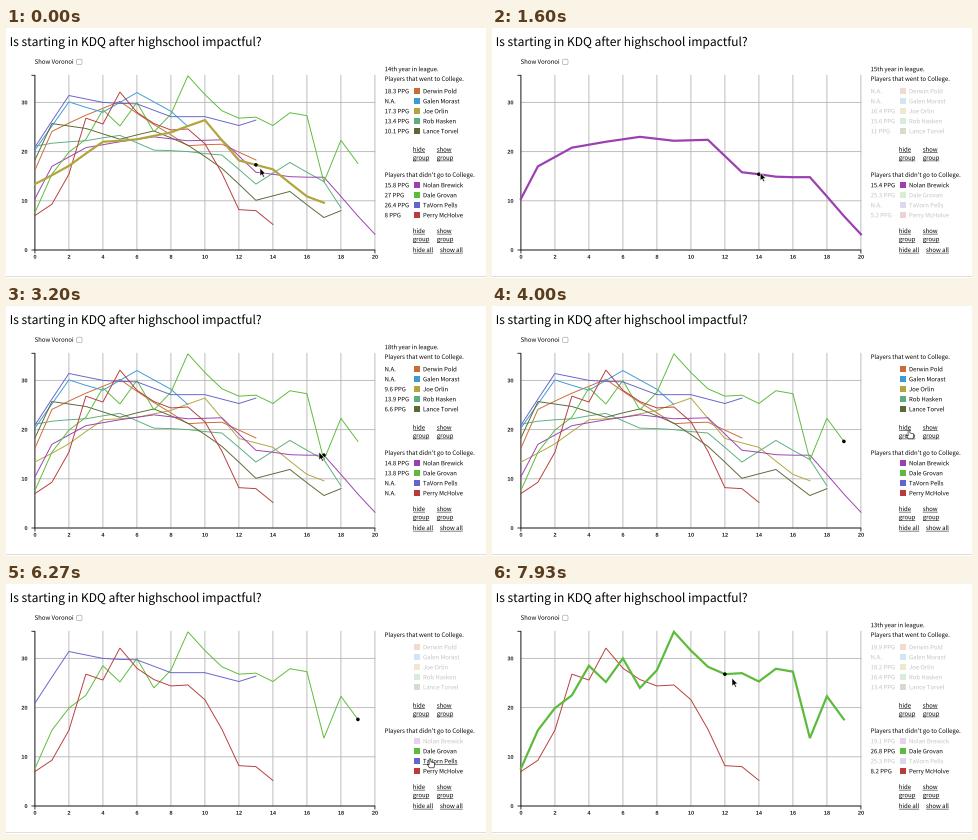
Animation of 480 by 250 pixels, one loop 8000 ms. Source, as a matplotlib script:

```python
import numpy as np
import matplotlib.pyplot as plt
from matplotlib.animation import FuncAnimation
from matplotlib.patches import (Circle, FancyBboxPatch, PathPatch, Polygon,
                                Rectangle)
from matplotlib.textpath import TextPath
from matplotlib.transforms import Affine2D

W, H, DPI = 480, 250, 80
STEP, FRAMES = 50, 160
PT = 72 / DPI  # points per pixel
X0, Y0, DX, DY = 28.9, 222, 17, 4.92
X1, TOP = X0 + 20 * DX, 47.3
FADE = 0.24
SANS = "Noto Sans CJK JP"

fig = plt.figure(figsize=(W / DPI, H / DPI), dpi=DPI, facecolor="white")
ax = fig.add_axes([0, 0, 1, 1])
ax.set_xlim(0, W)
ax.set_ylim(H, 0)
ax.axis("off")


def line(xs, ys, color, width, **kw):
    return ax.plot(xs, ys, color=color, lw=width * PT, snap=False, **kw)[0]


class Label:
    """Text drawn as outlines, so that it keeps its exact position."""

    def __init__(self, x, y, s, size=5.95, align=0, color="black",
                 family=SANS, weight="normal"):
        self.place = x, y, align
        self.size = size
        self.prop = {"family": family, "weight": weight}
        self.string = None
        self.patch = ax.add_patch(PathPatch(
            TextPath((0, 0), "x", size=size, prop=self.prop),
            fc=color, lw=0, snap=False, zorder=5))
        self.write(s)

    def write(self, s):
        if s == self.string:
            return
        self.string = s
        self.patch.set_visible(bool(s))
        if s:
            x, y, align = self.place
            path = TextPath((0, 0), s, size=self.size, prop=self.prop)
            x -= align * path.get_extents().x1
            self.patch.set_path(
                Affine2D().scale(1, -1).translate(x, y).transform_path(path))

    def underline(self):
        box = self.patch.get_path().get_extents()
        y = self.place[1] + 1.1
        return line([box.x0, box.x1], [y, y], "black", 0.5)


def career(seasons, values, first, step):
    years = sorted({0, seasons - 1, *range(first, seasons, step)})
    return np.interp(range(seasons), years, values).round(1)


class Player:
    def __init__(self, name, color, seasons, values, first=0, step=2):
        k = len(players)
        self.row = 65.3 + 10 * k + (44 if k > 4 else 0)
        self.points = career(seasons, values, first, step)
        self.xs = X0 + DX * np.arange(seasons)
        self.ys = Y0 - DY * self.points
        self.curve = line(self.xs, self.ys, color, 1, solid_joinstyle="miter")
        self.swatch = ax.add_patch(
            Rectangle((407.5, self.row - 5.3), 6, 6, fc=color, ec="none"))
        self.label = Label(417, self.row, name)
        self.under = self.label.underline()
        self.stat = Label(378.6, self.row, "")
        players.append(self)

    def value(self, year):
        if year < len(self.points):
            return f"{self.points[year]:g} PPG"
        return "N.A."

    def update(self, shown, bold, year, hovered):
        self.curve.set_visible(shown)
        self.curve.set_linewidth((2.2 if bold else 0.95) * PT)
        self.curve.set_zorder(4 if bold else 3)
        for part in (self.swatch, self.label.patch, self.stat.patch):
            part.set_alpha(1 if shown else FADE)
        self.under.set_visible(hovered)
        self.stat.write("" if year is None else self.value(year))


# Grid and axes
GRID, INK = "#b8b8b8", "#222222"
TICK = dict(size=5.5, family="Liberation Sans", color=INK)
for k in range(0, 21, 2):
    x = X0 + DX * k
    line([x, x], [TOP, Y0], GRID, 0.9, zorder=1)
    Label(x, 230.7, str(k), align=0.5, weight="bold", **TICK)
for v in range(0, 31, 10):
    y = Y0 - DY * v
    line([X0, X1], [y, y], GRID, 0.9, zorder=1)
    Label(21.3, y + 2, str(v), align=1, weight="bold", **TICK)
line([X0 - 3, X0, X0, X0 - 3], [TOP, TOP, Y0, Y0], INK, 0.9, zorder=2)
line([X0, X0, X1, X1], [Y0 + 3, Y0, Y0, Y0 + 3], INK, 0.9, zorder=2)
line([0, W], [248.5, 248.5], "#dddddd", 1)

# Headings and controls
Label(3.7, 18, "Is starting in KDQ after highschool impactful?", 12)
Label(28.6, 35.8, "Show Voronoi", 6)
ax.add_patch(FancyBboxPatch((70.6, 31.2), 5.4, 5.4, fc="white", ec="#aaaaaa",
                            boxstyle="round,pad=0,rounding_size=1.4",
                            lw=0.7 * PT))
year_text = Label(378.6, 43.2, "")
Label(378.6, 52.9, "Players that went to College.")
Label(378.6, 148.9, "Players that didn't go to College.")
for y in (123.6, 205):
    for x, word in ((406.8, "hide"), (430.8, "show")):
        Label(x, y, word).underline()
        Label(x, y + 8.2, "group").underline()
Label(406.8, 224, "hide all").underline()
Label(434, 224, "show all").underline()

# Steady careers need only every other season
players = []
Player("Derwin Pold", "#cc6b35", 14,
       [16.2, 24.1, 27.4, 30.2, 25.5, 21.2, 21.5, 18.3], first=1)
Player("Galen Morast", "#3c9ad6", 10, [20.3, 30.1, 28, 32, 28.2, 25.1])
Player("Joe Orlin", "#b2a53c", 18,
       [13.4, 17.1, 22, 22.5, 23.9, 26.4, 18.2, 16.4, 10.9, 9.6])
Player("Rob Hasken", "#5bae7d", 19,
       [21.1, 21.7, 22.2, 23.3, 20.3, 20, 19.3, 13.4, 17.8, 13.9, 8.6],
       first=1)
Player("Lance Torvel", "#5a6a34", 19,
       [18.3, 25.7, 24.7, 22.5, 24.2, 21.3, 16.6, 10.1, 11.9, 6.6, 8],
       first=1)
Player("Nolan Brewick", "#9c3fb0", 21,
       [10.4, 17, 20.8, 22, 23, 22.2, 22.4, 15.8, 14.9, 14.8, 6.9, 3.2],
       first=1)
Player("Dale Grovan", "#5cbb3a", 20,
       [7.6, 15.4, 19.9, 22.5, 28.5, 25.2, 30, 24, 27.6, 35.4, 31.6, 28.3,
        26.8, 27, 25.3, 27.9, 27.3, 13.8, 22.3, 17.6], step=1)
Player("TaVorn Pells", "#6464cc", 14,
       [20.9, 31.4, 30, 29.7, 27.1, 27.1, 25.3, 26.4])
Player("Perry McHolve", "#b83c3c", 15,
       [7, 9.3, 15.4, 26.8, 25.6, 32.1, 28, 25.7, 24.4, 24.6, 21.6, 15.6,
        8.2, 8, 5.2], step=1)

dot = ax.add_patch(Circle((0, 0), 1.8, fc="black", ec="none", zorder=6))
ARROW = np.array([(0, 0), (0, 8.2), (1.9, 6.5), (3.2, 9.2), (4.5, 8.7),
                  (3.3, 6), (5.6, 5.8)])
HAND = np.array([(-.9, 0), (.8, 0), (.9, 2.9), (4.8, 4), (4, 8.8),
                 (-.6, 8.8), (-2.8, 5.2), (-.9, 5.8)])
arrow = ax.add_patch(Polygon(ARROW, fc="black", ec="white", lw=0.5, zorder=9))
hand = ax.add_patch(Polygon(HAND, fc="white", ec="#222222", lw=0.6, zorder=9,
                            joinstyle="round"))

# Pointer moves: start, end, where to
REST = np.array([254, 140])
MOVES = [(70, 130, 254, 144), (1330, 2270, 313, 146), (3530, 4000, 417, 124),
         (4930, 5400, 424, 157), (6070, 6270, 424, 175),
         (6670, 7270, 258, 180), (7530, 7930, 240, 94)]
# Visible players after each click
ALL = range(9)
CLICKS = [(0, ALL), (800, [5]), (3000, ALL), (4930, ALL[5:]),
          (5730, ALL[6:]), (6470, ALL[6::2])]
# After a redraw the curve stays thin until the pointer moves again
THIN = [(800, 1400), (3000, 3600)]


def clock(i):
    return i * STEP + 30


def pointer(t):
    at = REST
    for start, end, *goal in MOVES:
        u = np.clip((t - start) / (end - start), 0, 1)
        at = at + (np.array(goal) - at) * u * u * (3 - 2 * u)
    return at


def visible(t):
    return [who for start, who in CLICKS if start <= t][-1]


def in_chart(x, y):
    return X0 <= x <= X1 and TOP <= y <= Y0


def nearest(x, y, shown):
    cells = [(np.hypot(px - x, py - y), k, n) for k in shown
             for n, (px, py) in enumerate(zip(players[k].xs, players[k].ys))]
    return min(cells)[1:]


def hover_states():
    states, last = [], None
    for i in range(FRAMES):
        x, y = pointer(clock(i))
        if in_chart(x, y):
            last = nearest(x, y, visible(clock(i)))
        states.append(last)
    return states


HOVER = hover_states()


def ordinal(n):
    if 10 < n % 100 < 14:
        return f"{n}th"
    return f"{n}" + {1: "st", 2: "nd", 3: "rd"}.get(n % 10, "th")


def update(i):
    t = clock(i)
    x, y = pointer(t)
    shown = visible(t)
    who, year = HOVER[i]
    inside = in_chart(x, y)
    thin = any(a <= t < b for a, b in THIN)
    in_links = 405 <= x <= 458
    over_link = in_links and (118 <= y <= 134 or 199 <= y <= 226)

    for k, p in enumerate(players):
        hovered = in_links and p.row - 6 <= y <= p.row + 3
        over_link = over_link or hovered
        p.update(k in shown, inside and k == who and not thin,
                 year if inside else None, hovered)

    year_text.write(f"{ordinal(year + 1)} year in league." if inside else "")
    dot.center = players[who].xs[year], players[who].ys[year]
    arrow.set_xy(ARROW + (x, y))
    hand.set_xy(HAND + (x, y))
    arrow.set_visible(not over_link)
    hand.set_visible(over_link)
    return []


anim = FuncAnimation(fig, update, frames=FRAMES, interval=STEP, repeat=True,
                     repeat_delay=0, blit=False, cache_frame_data=False)
plt.show()
```
